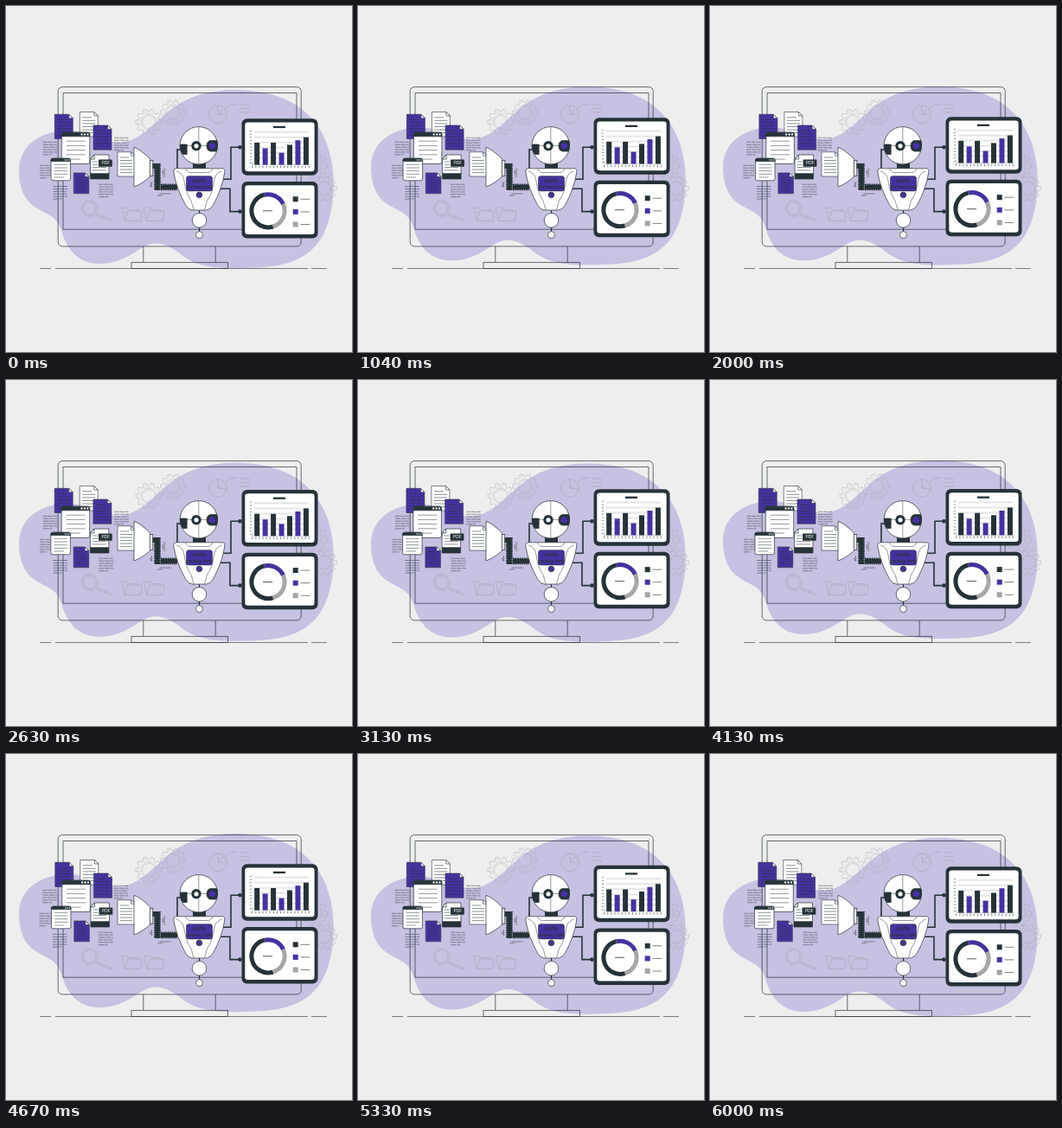
An HTML page for the animation above (6040 ms loop, 400 by 400 pixels).

```html
<!DOCTYPE html>
<html lang="en">
<head>
<meta charset="utf-8">
<title>Data extraction</title>
<style>
html, body { margin: 0; width: 100%; height: 100%; overflow: hidden; background: #eee; }
svg { display: block; width: 100vw; height: 100vh; }
text { font-family: "Liberation Sans", Arial, sans-serif; text-anchor: middle; }
.bold { font-weight: bold; }
</style>
</head>
<body>
<svg id="stage" viewBox="0 0 400 400"></svg>
<script>
const INK = '#263238', VIOLET = '#45329f', LILAC = '#c7c1e2', GREY = '#a6a6a6', FAINT = '#a9a7b3';
const LOOP = 6040, FPS = 24;

const path = (d, fill = 'none', stroke = INK, w = .7, more = '') =>
  `<path d="${d}" fill="${fill}" stroke="${stroke}" stroke-width="${w}" ${more}/>`;
const box = (x, y, w, h, fill, r = 0, stroke = 'none', sw = .7) =>
  `<rect x="${x}" y="${y}" width="${w}" height="${h}" rx="${r}" fill="${fill}" stroke="${stroke}" stroke-width="${sw}"/>`;
const disc = (x, y, r, fill = 'none', stroke = 'none', w = .7, more = '') =>
  `<circle cx="${x}" cy="${y}" r="${r}" fill="${fill}" stroke="${stroke}" stroke-width="${w}" ${more}/>`;
const group = (id, ...parts) => `<g id="${id}">${parts.join('')}</g>`;
const rows = (n, f) => Array.from({ length: n }, (_, i) => f(i)).join('');

function gear(cx, cy, r, teeth = 10) {
  const pts = [];
  for (let i = 0; i < teeth; i++) {
    for (const [a, k] of [[-.3, .8], [-.2, 1], [.2, 1], [.3, .8]]) {
      const t = (i + a) / teeth * 2 * Math.PI;
      pts.push(`${(cx + r * k * Math.cos(t)).toFixed(2)} ${(cy + r * k * Math.sin(t)).toFixed(2)}`);
    }
  }
  return path(`M${pts.join('L')}Z`, 'none', FAINT, .5) +
    disc(cx, cy, r * .6, 'none', FAINT, .5, 'stroke-dasharray="2 .8"') +
    disc(cx, cy, r * .5, 'none', FAINT, .4);
}

function sheet(x, y, w, h, fill) {
  const f = 4.5;
  return path(`M${x} ${y}h${w - f}l${f} ${f}v${h - f}h${-w}Z`, fill, INK, .6) +
    path(`M${x + w - f} ${y}v${f}h${f}Z`, '#fff', INK, .6) +
    rows(6, i => path(`M${x + 3} ${y + h * (.22 + i * .125)}h${i ? w - 6 : w - 10}`, 'none', INK, .55));
}

function browser(x, y, w, h, bar, dot) {
  return box(x, y, w, h, '#fff', 2, INK) +
    path(`M${x} ${y + bar}v${2 - bar}q0-2 2-2h${w - 4}q2 0 2 2v${bar - 2}Z`, INK) +
    rows(3, i => disc(x + w - dot * (2 + i * 3), y + bar / 2, dot, '#fff')) +
    rows(5, i => path(`M${x + w * .17} ${y + bar + (h - bar) * (.17 + i * .165)}h${w * (i < 4 ? .67 : .5)}`, 'none', INK, .5));
}

const note = (x, y, w) => rows(6, i =>
  path(`M${x} ${y + i * 2.9}h${i === 5 ? w * .65 : w}`, 'none', INK, .5, `stroke-dasharray="${5 + i % 3} .7"`));

const folder = x => path(`M${x} 233.5h7l1.5 2h10l1 3M${x} 233.5l3 15h18.5l2-11.5h-17l-3 11.5`, 'none', FAINT, .6);

const frame = y => box(272.5, y, 88, 65.5, INK, 6) + box(276.3, y + 4.3, 80.3, 56.7, '#fff', 3);

function arc(cx, cy, r, from, to, color) {
  const at = a => `${cx + r * Math.cos(a * Math.PI / 180)} ${cy + r * Math.sin(a * Math.PI / 180)}`;
  return path(`M${at(from)}A${r} ${r} 0 ${to - from > 180 ? 1 : 0} 1 ${at(to)}`, 'none', color, 5);
}

const blob = group('blob', path(
  'M15 190C15 164 36 145 70 144C96 144 109 157 130 158C155 158 172 133 194 117C214 103 238 97 265 97' +
  'C316 97 350 116 367 150C378 173 381 201 377 230C371 269 354 301 288 302.5C254 304 225 304 206 290' +
  'C190 277 175 269 158 279C145 287 131 298 108 298C84 298 70 282 64 259C58 240 43 241 29 229C18 219 15 204 15 190Z',
  LILAC, 'none'));

const backdrop = [
  gear(165, 134, 15), gear(193, 123, 14.5), gear(357, 184, 15), gear(368, 211, 14.5),
  disc(245, 125.3, 10.3, 'none', FAINT, .6),
  path('M245 115v10.3h10.3M245 125.3l7-7M254 118l6-4.5h7M271 114h11M271 118.5h11M271 123h11', 'none', FAINT, .6),
  disc(96.5, 234, 9.3, 'none', FAINT, .6), disc(96.5, 234, 7.4, 'none', FAINT, .6),
  path('M104 239.5l3.5 2l14 5.3q1.5 2-1 1.6l-14-5.4l-3-2.5', 'none', FAINT, .6),
  folder(134), folder(159.5)
];

const monitor = [
  box(60.2, 93.6, 281, 184.3, 'none', 5, INK, .7),
  path('M66 258.2V100.5H336V258.2Z', 'none', INK, .7),
  path('M158.8 278v18.3M242.2 278v18.3', 'none', INK, .7),
  box(145, 296.3, 111.5, 7.2, 'none', 0, INK, .7),
  path('M39 303.5h13M57 303.5h292M353 303.5h18', 'none', INK, .6)
];

const notes = group('notes', note(42.7, 157.3, 16.5), note(125, 152.3, 16.5),
  note(39, 184.3, 13), note(54.5, 208.5, 16.5), note(107.2, 206.2, 17));

const pdf = path('M102 172h17v28H97.5V177Z', '#fff') + path('M102 172v5h-4.5Z', '#fff') +
  rows(4, i => path(`M100 ${180 + i * 3.3}h${i < 2 ? 6 : 16}`, 'none', INK, .55)) +
  box(97.5, 193.3, 21.5, 6.7, INK) + box(107, 177.5, 15.8, 8.2, INK, .6) +
  '<text x="115.3" y="183.4" font-size="4.8" fill="#fff">PDF</text>';

const files = group('files',
  sheet(56.3, 125.3, 21, 28.2, VIOLET), sheet(85.3, 122.5, 21, 28.5, '#fff'),
  sheet(101, 138, 21, 28.2, VIOLET), browser(64.3, 146.2, 32.5, 36.3, 4.6, 1.15),
  pdf, browser(52, 176.2, 22.5, 25.6, 3.4, .75), sheet(78.3, 193, 17.5, 23.8, VIOLET));

// A pipe with raised rings
const hose = d => path(d, 'none', INK, 5.6) + path(d, 'none', INK, 7.8, 'stroke-dasharray="1.6 1"');

const intake = [
  sheet(129, 168.8, 20, 28.2, '#fff'),
  path('M148 163.3Q156 166 167 177.3V197Q156 206.500 148 209Z', '#fff'),
  box(166.5, 178.5, 3.3, 17.8, '#fff', 0, INK),
  path('M169.5 185h4', 'none', INK, 5.6),
  hose('M175 182V213'), hose('M179 209.4H198'),
  path('M183 187v11M181.3 190v5M168.5 203v7M167 205v4M177.5 217h13M175 219h6', 'none', INK, .5)
];

const wires = path('M204 166h-6v24M250 200.3h10V163.2h11M247 211.3h12V237.6h12', 'none', INK, 1.6) +
  disc(270.5, 163.2, 2.3, INK) + disc(270.5, 237.6, 2.3, INK);

const head = [
  box(216, 179.5, 15, 9.5, INK),
  disc(222.8, 161.3, 21.7, '#fff', INK, .7),
  path('M222.8 139.6V183M201.5 161.3h42.6', 'none', INK, .5),
  path('M201.5 160h7.7v11.5h-4.7q-2.500-3-3-6Z', INK),
  path('M243.8 155.6h-7.5q-4.3 1-4.3 6.2t4.3 6.2h7q2.4-6.5.5-12.4Z', INK),
  disc(238.4, 161.8, 3.8, VIOLET),
  disc(220, 161.8, 5.7, INK), disc(220, 161.8, 2.6, '#fff')
];

const torso = [
  path('M196.500 187.8H250Q253.500 188 252.800 192Q250 211 239.500 230Q236.500 235.800 231.500 236H215.500' +
    'Q210.500 235.800 207.500 230Q197 211 193.800 192Q193.500 188 196.500 187.8Z', '#fff', INK, .7),
  path('M207.500 188q1.5 4.500 6 4.500h19.500q4.500 0 6-4.500M197 191Q204.500 193 206 202Q207.500 216 214 225L217 236' +
    'M249.500 191Q242 193 240.500 202Q239 216 232.500 225L229.500 236', 'none', INK, .5),
  box(208.5, 196.7, 30, 17.2, VIOLET, 2.5, INK, .6),
  `<text class="bold" x="223.5" y="203.9" font-size="6" fill="${INK}">DATA</text>`,
  `<text class="bold" x="223.5" y="210.8" font-size="4.4" fill="${INK}">EXTRACTION</text>`,
  disc(223.4, 218.4, 3.2, VIOLET, INK, .9),
  path('M223.5 236v30', 'none', INK, 1.2),
  disc(223.5, 247.8, 8.3, '#fff', INK, .7),
  disc(223.5, 264.6, 4, '#fff', INK, .7)
];

const tops = [158, 164.5, 158, 169.7, 160.5, 155.2, 151.7];
const bars = [
  frame(130.3),
  box(309, 138.8, 14, 2.3, INK),
  rows(6, i => box(287, 144.7 + i * 6, 63, 2, '#e6e6e6')),
  rows(11, i => path(`M281.7 ${144.5 + i * 3.7}h2.5`, 'none', INK, .5)),
  path('M284.5 180v3.6H351.5', 'none', GREY, .5),
  rows(17, i => path(`M${284.7 + i * 4.1} 184.7v2.6`, 'none', INK, .6)),
  tops.map((y, i) => box(287.2 + i * 9.45, y, 6, 183.6 - y, i % 2 ? VIOLET : INK)).join('')
];

const donut = [
  frame(202.9),
  arc(303, 236.8, 19.1, -104, -24, VIOLET), arc(303, 236.8, 19.1, -24, 73, GREY),
  arc(303, 236.8, 19.1, 73, 256, INK),
  path('M297 236.8h11', 'none', INK, .8),
  [INK, VIOLET, GREY].map((c, i) => box(331.7, 220.3 + i * 14.6, 6, 6, c) +
    path(`M340.7 ${223.3 + i * 14.6}h10.5`, 'none', INK, .6)).join('')
];

const stage = document.getElementById('stage');
stage.innerHTML = [blob, ...backdrop, ...monitor, notes, files, ...intake, wires, ...head, ...torso,
  group('panels', ...bars, ...donut)].join('');

// Keyframes: [time in ms, offset in px], linear in between
const tracks = {
  blob: [[0, 0], [1500, -5.5], [3000, 0], [4500, -5.5], [6000, 0]],
  panels: [[0, 0], [2000, -2.1], [3700, -5.2], [6000, 0]],
  sway: [[0, 0], [1040, .1], [2000, .6], [2630, -.1], [3500, -.6], [4670, .5], [6000, -.5]]
};

function sample(keys, t) {
  for (let i = 1; i < keys.length; i++) {
    const [t0, a] = keys[i - 1], [t1, b] = keys[i];
    if (t <= t1) return a + (b - a) * (t - t0) / (t1 - t0);
  }
  return keys[keys.length - 1][1];
}

const move = (id, x, y) => document.getElementById(id).setAttribute('transform', `translate(${x} ${y})`);

function draw(now) {
  const t = Math.floor((now % LOOP + 8) * FPS / 1000) * 1000 / FPS;
  const sway = sample(tracks.sway, t);
  move('blob', 0, sample(tracks.blob, t));
  move('panels', 0, sample(tracks.panels, t));
  move('files', sway, 0);
  move('notes', -sway, 0);
  requestAnimationFrame(draw);
}
draw(performance.now());
</script>
</body>
</html>
```
